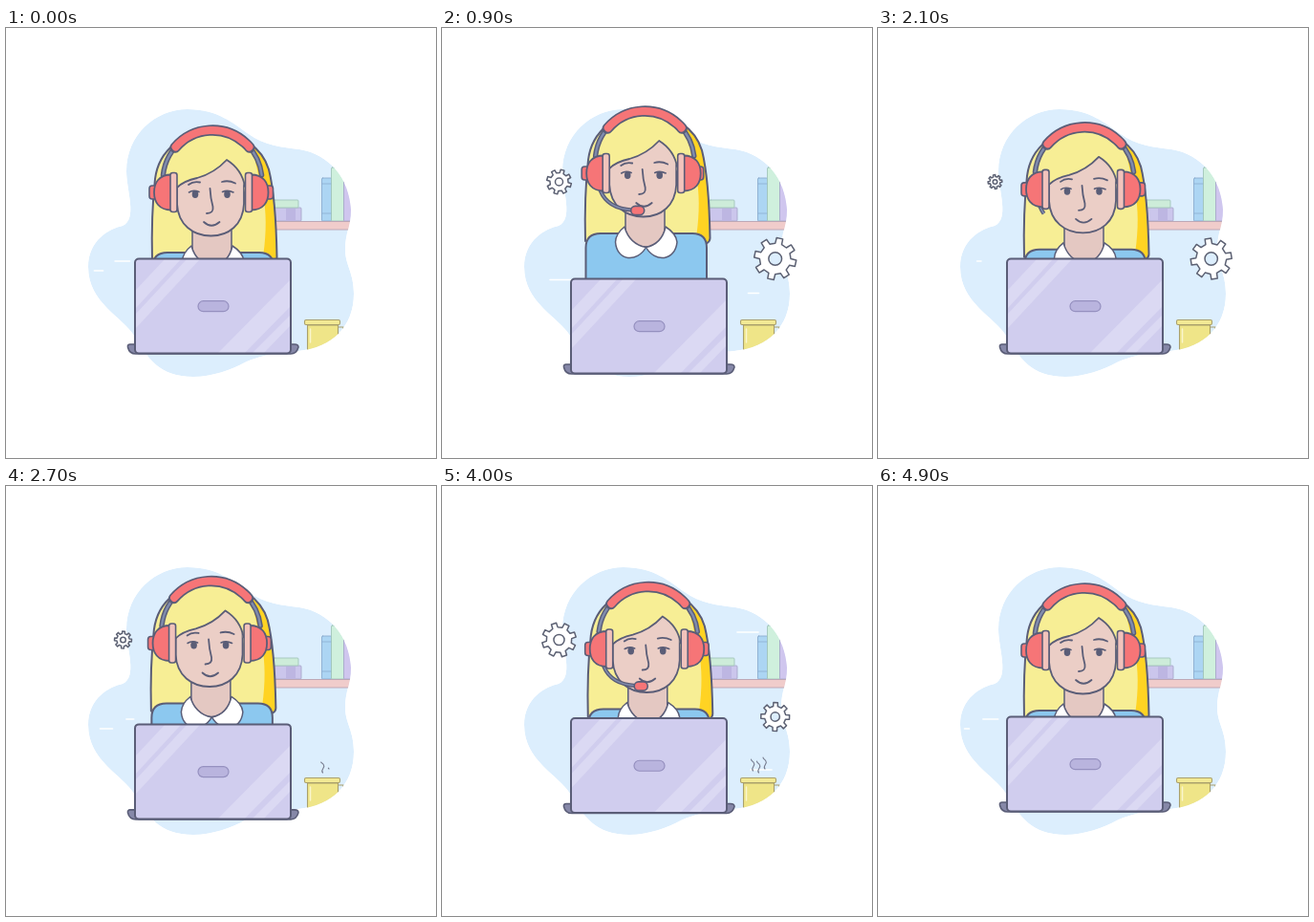
An HTML page with a canvas for the animation above (5000 ms loop, 450 by 450 pixels).

```html
<!DOCTYPE html>
<html lang="en">
<head>
<meta charset="utf-8">
<title>Support agent</title>
<style>
html, body { margin: 0; width: 100%; height: 100%; overflow: hidden; background: #fff; }
canvas { display: block; width: 450px; height: 450px; }
</style>
</head>
<body>
<canvas id="stage" width="450" height="450"></canvas>
<script>
const ctx = document.getElementById('stage').getContext('2d');
const CYCLE = 2500, STEP = 100, LEAD = 20;
const INK = '#5a5d77', CORAL = '#f67577', SKIN = '#ebcec6', HAIR = '#f7ee95', LILAC = '#d0cdee', STEEL = '#7f8bad';

const BLOB = new Path2D('M126 150C126 112 156 85 190 85C222 85 238 100 254 111C270 123 290 125 307 127' +
  'C339 132 359 158 361 190C361 208 355 214 355 232C355 248 364 256 364 278C364 312 342 334 306 338' +
  'C280 341 268 342 250 350C235 358 216 365 196 365C160 365 148 345 134 322C122 302 86 288 86 250' +
  'C86 222 108 210 122 207C138 200 126 170 126 150Z');

const clamp = u => Math.max(0, Math.min(1, u));
const smooth = (a, b, t) => { const u = clamp((t - a) / (b - a)); return u * u * (3 - 2 * u); };
const wrap = t => ((t + CYCLE * 1.5) % CYCLE) - CYCLE / 2;

function shape(path, fill, line, width = 1.8, rule = 'nonzero') {
  const p = typeof path === 'string' ? new Path2D(path) : path;
  if (fill) { ctx.fillStyle = fill; ctx.fill(p, rule); }
  if (line) { ctx.strokeStyle = line; ctx.lineWidth = width; ctx.stroke(p); }
}

function box(x, y, w, h, r, fill, line, width) {
  const p = new Path2D();
  p.roundRect(x, y, w, h, r);
  shape(p, fill, line, width);
}

function oval(x, y, rx, ry, fill) {
  const p = new Path2D();
  p.ellipse(x, y, rx, ry, 0, 0, 7);
  shape(p, fill);
}

function layer(x, y, draw) {
  ctx.save();
  ctx.translate(x, y);
  draw();
  ctx.restore();
}

function shelf() {
  const edge = '#a9a9cb', mint = '#a2c6ba', blue = '#8cadd0';
  box(279, 188, 30, 14, 1, '#cbc6ec', edge, 0.9);
  box(293, 188, 10, 14, 0, '#bdb6e2');
  box(280, 180, 26, 8, 1, '#cdecd9', mint, 0.9);
  box(330.5, 157, 10, 45, 1, '#acd5f3', blue, 0.9);
  box(340.5, 146, 13, 56, 1, '#cff0dd', mint, 0.9);
  box(353.5, 160, 14, 42, 1, '#cfc6ee', edge, 0.9);
  shape('M331 163H340M331 194H340', null, blue, 0.8);
  box(276, 202.5, 90, 8.5, 0, '#f0cccb', '#b9a3b1', 0.9);
}

function cup() {
  const line = '#aaa06c';
  shape('M347 313H353V320H347', null, line, 1.2);
  shape('M315.5 311H347.5V337H315.5Z', '#efe588', line, 1.1);
  box(312.5, 305.5, 37, 5, 1.5, '#f2e994', line, 1.1);
  shape('M318.5 315V329', null, '#faf6cd', 1.5);
}

function dashes(t) {
  // y, centre x, time of full length, length
  const rows = [[244, 119, 2430, 16], [254, 105, 200, 13], [263.5, 124, 900, 22],
    [277.5, 326, 900, 11], [153, 320, 1500, 22], [297, 334, 1500, 22]];
  for (const [y, x, at, len] of rows) {
    const d = wrap(t - at);
    if (Math.abs(d) >= 400) continue;
    const half = len / 2 * Math.cos(d / 400 * Math.PI / 2), cx = x + d * 0.04;
    shape(`M${cx - half} ${y}H${cx + half}`, null, '#fff', 1.6);
  }
}

function steam(t) {
  const wisps = [[331.5, 288, 100], [338, 284, 180], [325.5, 286, 200]];
  for (const start of [0, 1150]) {
    for (const [x, top, delay] of wisps) {
      const age = t - start - delay;
      const a = smooth(250, 550, age), b = smooth(0, 140, age);
      if (b - a < 0.03) continue;
      ctx.save();
      ctx.setLineDash([(b - a) * 16, 60]);
      ctx.lineDashOffset = -a * 16;
      layer(x, top, () => shape('M0 12C-3 9 3 7 1 4C0 2 -2 2 -2 0', null, '#74798c', 1.1));
      ctx.restore();
    }
  }
}

function gear(x, y, r, turn) {
  if (r < 1) return;
  const p = new Path2D(), teeth = 8, pitch = Math.PI * 2 / teeth;
  const inner = r * 0.74;
  for (let i = 0; i < teeth; i++) {
    const a = turn + i * pitch;
    for (const [k, rad] of [[-0.27, inner], [-0.19, r], [0.19, r], [0.27, inner]]) {
      p.lineTo(x + Math.cos(a + k * pitch) * rad, y + Math.sin(a + k * pitch) * rad);
    }
  }
  p.closePath();
  p.moveTo(x + r * 0.31, y);
  p.arc(x, y, r * 0.31, 0, Math.PI * 2);
  shape(p, '#fff', '#5c6173', 1.5, 'evenodd');
}

function gears(t) {
  const pulse = (at, period) => Math.cos((t - at) / period * Math.PI * 2);
  const left = smooth(80, 320, t) * (1 - smooth(1950, 2250, t));
  const right = smooth(550, 800, t) * (1 - smooth(2120, 2420, t));
  const turn = Math.PI / 4 * t / CYCLE;
  gear(122.5, 161, left * (15.8 + 3 * pulse(1370, 1050)), turn);
  gear(348.7, 241.5, right * (18.5 + 3.6 * pulse(900, 1100)), 0.5 - turn);
}

function torso() {
  const hair = 'M153 243C152 205 153 185 156 158C160 127 185 109 217 109C245 109 268 125 275 148' +
    'C281 172 283 212 283.5 240Q283 247 272 246';
  shape(hair + 'H153Z', HAIR);
  shape('M257 122C268 131 273 141 275 148C281 172 283 212 283.5 240Q283 247 272 246H268C272 222 273 200 270 180Z', '#ffd323');
  shape(hair, null, INK, 2);
  shape('M153.5 284V250Q153.5 235 169 235H265Q280 235 280 250V284Z', '#8cc8ef', INK, 2);
  shape('M195 200V234C197 254 235 254 236 234V200Z', '#e4c8c2', INK, 1.5);
  shape('M194 228Q185 235 184.5 244C186 264 207 266 216.5 249.5Q199 246 194 228Z', '#fff', INK, 1.5);
  shape('M237 228Q248 235 249 244C247 264 226 266 216.5 249.5Q233 246 237 228Z', '#fff', INK, 1.5);
}

function face() {
  shape('M179 150V184C180 206 196 217.5 214.5 217.5C233 217.5 248 206 249 184V150Q240 130 215 130Q190 130 179 150Z', SKIN, INK, 1.8);
  shape('M172 172C170 138 187 114 215 113C243 114 259 138 257 172H250Q249 152 231 138Q218 152 200 157Q186 160 179 167V172Z', HAIR);
  shape('M179 167Q186 160 200 157Q218 152 231 138Q247 148 250 166', null, INK, 1.8);
  shape('M191 164Q196 160 203 161.5M226 161Q233 159 240 162.5', null, INK, 1.8);
  oval(198, 174, 3.3, 3.9, INK);
  oval(231.5, 174, 3.3, 3.9, INK);
  shape('M191.5 172Q196 169 202 171.5M226.5 171.5Q232 169 238 172', null, INK, 1.6);
  shape('M213.5 168Q214 178 216.5 187Q217.5 194 210 194', null, INK, 1.8);
  shape('M207 203Q215 210.5 223.5 203', null, INK, 1.8);
}

function arch(from, to, width, color) {
  ctx.beginPath();
  ctx.ellipse(216, 160.5, 52, 53.5, 0, from * Math.PI, to * Math.PI);
  ctx.lineWidth = width;
  ctx.strokeStyle = color;
  ctx.stroke();
}

function earcup(knob) {
  box(150 + knob, 165, 8, 14, 3, CORAL, INK, 1.6);
  shape('M173 153.5C160 153.5 155 162 155 172C155 182 160 190.5 173 190.5Z', CORAL, INK, 1.8);
  box(172, 151.5, 7, 41, 2.5, '#f2c3bc', INK, 1.6);
}

function headset(t, lift) {
  const mic = smooth(350, 700, t) * (1 - smooth(1850, 2200, t));
  arch(1.04, 1.96, 5.4, INK);
  arch(1.04, 1.96, 2.4, STEEL);
  arch(1.23, 1.77, 11.4, INK);
  arch(1.235, 1.765, 8, CORAL);
  if (mic > 0.02) {
    const arm = 'M169.5 190Q177 209 203 210.5';
    ctx.save();
    ctx.setLineDash([mic * 42, 90]);
    ctx.lineCap = 'butt';
    shape(arm, null, INK, 4.2);
    shape(arm, null, STEEL, 1.6);
    ctx.restore();
    if (mic > 0.75) {
      const s = (mic - 0.75) * 4;
      box(208.5 - 7 * s, 211 - 4.6 * s, 14 * s, 9.2 * s, 4.5 * s, CORAL, INK, 1.6);
    }
  }
  earcup(0);
  ctx.save();
  ctx.translate(429.5, 0);
  ctx.scale(-1, 1);
  earcup(2 * lift);
  ctx.restore();
}

function laptop() {
  shape('M137 331H130Q127 331 127.5 334Q129 341 136 341H298Q304 341 306 334Q306 331 302 331Z', '#8688a8', INK, 1.6);
  box(135, 241.5, 163, 99, 4, LILAC);
  const shine = '#dbd9f3';
  shape('M166 242H183L136 293V274Z M189 242H203L136 314V299Z', shine);
  shape('M298 263V291L250 340H222Z M298 300V311L270 340H258Z', shine);
  box(135, 241.5, 163, 99, 4, null, INK, 2);
  box(201, 285.7, 32, 11, 5.5, '#b9b4de', '#9590bf', 1.2);
}

function draw(t) {
  ctx.fillStyle = '#fff';
  ctx.fillRect(0, 0, 450, 450);
  ctx.lineCap = ctx.lineJoin = 'round';

  ctx.save();
  ctx.clip(BLOB);
  shape(BLOB, '#dceefd');
  shelf();
  cup();
  dashes(t);
  ctx.restore();
  steam(t);

  const lift = smooth(0, 480, t) * (1 - smooth(1200, 1560, t));
  const bob = 4.5 * Math.sin(Math.PI * clamp((t - 1560) / 790)) ** 2;
  layer(-3 * lift, -20 * lift - bob, () => {
    torso();
    layer(-0.8 * lift, 0, () => {
      face();
      headset(t, lift);
    });
  });
  layer(0, 21 * lift, laptop);
  gears(t);
}

let begin = null;
function tick(now) {
  if (begin === null) begin = now;
  const t = Math.floor((now - begin + LEAD) / STEP) * STEP;
  draw(t % CYCLE);
  requestAnimationFrame(tick);
}
requestAnimationFrame(tick);
</script>
</body>
</html>
```
